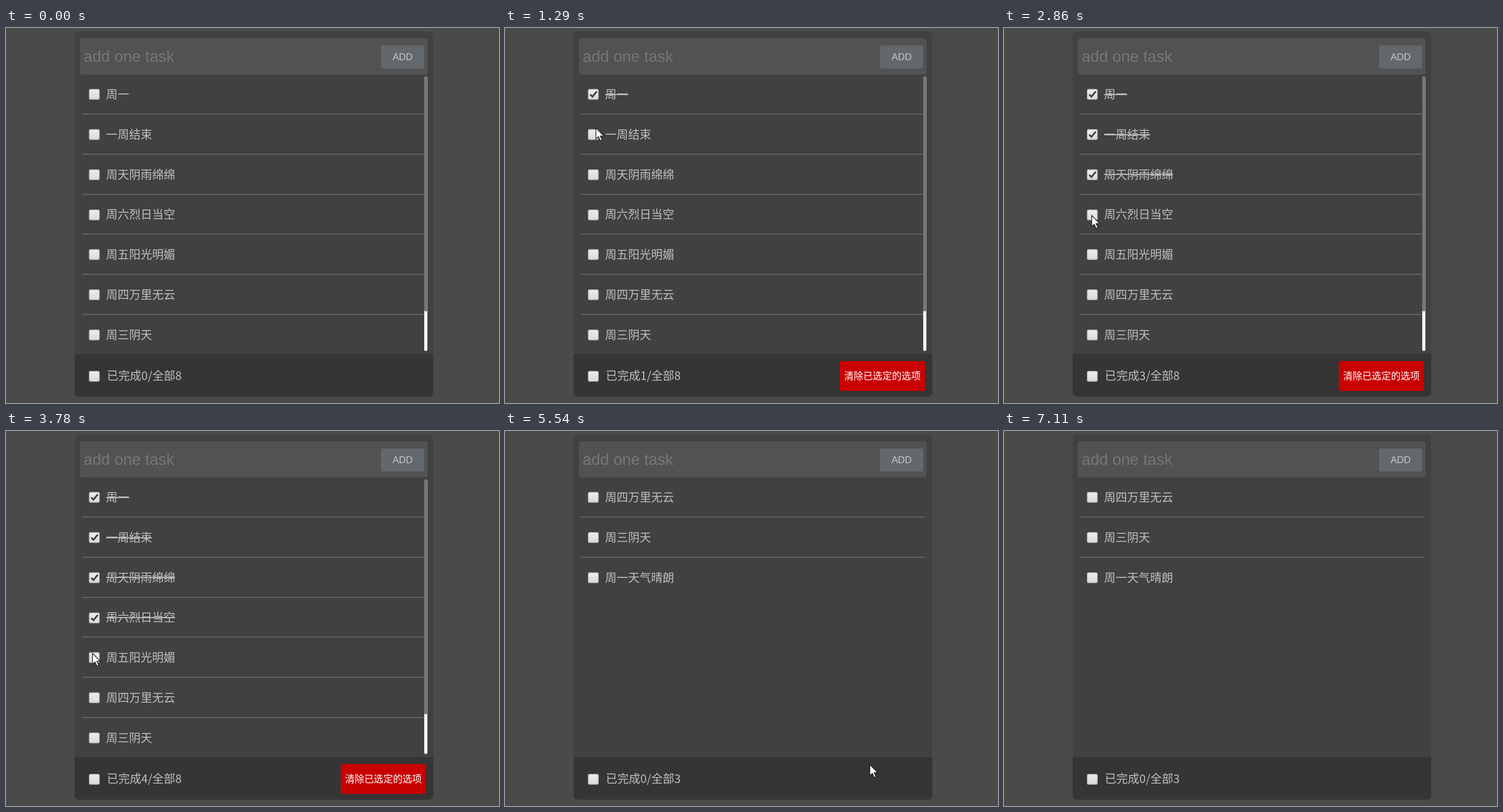
An HTML page with a canvas for the animation above (7.86 s loop, 857 by 653 pixels).

```html
<!DOCTYPE html>
<html lang="zh-CN">
<head>
<meta charset="utf-8">
<style>
  html, body { margin: 0; width: 100%; height: 100%; overflow: hidden; background: #4a4a48; }
  canvas { display: block; }
</style>
</head>
<body>
<canvas id="stage" width="857" height="653"></canvas>
<script>
const ctx = document.getElementById('stage').getContext('2d');
const LOOP = 7860, ENTER_AT = 100, CLEAR_AT = 5490, EXIT_AT = 7110;
const HAN = '"Noto Sans CJK SC", "Noto Sans CJK", "Noto Sans CJK JP", sans-serif';
const LATIN = '"Liberation Sans", Arial, sans-serif';
const TEXT = '#c0c0bf';

const tasks = ['周一', '一周结束', '周天阴雨绵绵', '周六烈日当空',
  '周五阳光明媚', '周四万里无云', '周三阴天', '周一天气晴朗'];
const checkTimes = [1110, 1840, 2400, 3550, 4150];
const rowY = i => 115.7 + i * 69.8;

const linear = k => k;
const easeOut = k => 1 - (1 - k) ** 2;
const leg = (start, duration, x, y, ease = easeOut) => ({ start, duration, x, y, ease });

// The pointer drifts slightly left and up on the checkboxes further down.
const toCheckbox = (start, i) => leg(start, 350, 160 - 2.5 * i, rowY(i) + 6 - 1.5 * i);
const legs = [
  leg(ENTER_AT, 500, 216, 160, linear),
  toCheckbox(600, 0),
  ...checkTimes.slice(0, -1).map((time, i) => toCheckbox(time, i + 1)),
  leg(4280, 840, 633, 609),
  leg(CLEAR_AT, 950, 644, 341),
  leg(6440, EXIT_AT - 6440, 787, 653, linear)
];

const ARROW = new Path2D('M0 0V19.2L4.4 15.1L7.6 22.3L10.7 21L7.6 14H13.8Z');
const HAND = new Path2D('M-2.3 2Q-2.2 0 0 0Q2 0 2.2 2V8Q4.2 6.6 5.5 9Q7.7 8 8.8 10.2' +
  'Q12 9.6 12 13V18Q12 21 10 23V25.5H-1V23.5L-7 16Q-8.4 13.4-6 12.7Q-4.4 12.6-2.3 15Z');
const KNUCKLES = new Path2D('M2.2 8V12M5.5 9V12.5M8.8 10.2V13');

function box(x, y, w, h, radius, color) {
  ctx.fillStyle = color;
  ctx.beginPath();
  ctx.roundRect(x, y, w, h, radius);
  ctx.fill();
}

function label(text, x, y, size, color, family = HAN, align = 'left') {
  ctx.font = `${size}px ${family}`;
  ctx.textAlign = align;
  ctx.fillStyle = color;
  ctx.fillText(text, x, y);
}

function checkbox(centerY, checked) {
  const top = Math.round(centerY - 9.5);
  const shade = ctx.createLinearGradient(0, top, 0, top + 19);
  shade.addColorStop(0, '#eeeeee');
  shade.addColorStop(1, '#d9d9d9');
  box(144, top, 19, 19, 3, '#a3a3a3');
  box(145.2, top + 1.2, 16.6, 16.6, 2, shade);
  if (!checked) return;
  ctx.strokeStyle = '#3c3c3c';
  ctx.lineWidth = 3;
  ctx.beginPath();
  ctx.moveTo(148.2, top + 9.8);
  ctx.lineTo(152, top + 13.6);
  ctx.lineTo(159.5, top + 4.4);
  ctx.stroke();
}

function drawCard(cleared, done) {
  ctx.fillStyle = '#4a4a48';
  ctx.fillRect(0, 0, 857, 653);
  box(119.5, 6, 623, 636, 7, '#41413f');
  box(128.5, 18, 604.5, 63, 4, '#525252');
  label('add one task', 135, 59, 27.5, '#767676', LATIN);
  box(652, 30.5, 75, 40, 3, '#63686c');
  label('ADD', 689.5, 55.5, 16.667, '#c6c7c7', LATIN, 'center');

  const shown = cleared ? tasks.slice(5) : tasks.slice(0, 7);
  shown.forEach((task, i) => {
    const y = rowY(i);
    checkbox(y, i < done);
    label(task, 174, y + 7.3, 20, TEXT);
    if (i < done) box(174, Math.round(y - 1), task.length * 20, 1.7, 0, TEXT);
    if (i < shown.length - 1) {
      box(132, Math.round(y + 33.4), cleared ? 598 : 596, 1.5, 0, '#6a6d70');
    }
  });

  if (!cleared) {
    box(727, 84.5, 5.5, 478, 3, '#f4f4f4');
    box(727, 84.5, 5.5, 409, 3, '#767676');
  }
  box(119.5, 568, 623, 74, [0, 0, 7, 7], '#363434');
  checkbox(606.5, false);
  label(`已完成${done}/全部${cleared ? 3 : 8}`, 175.3, 613, 20, TEXT);
  if (done) {
    box(582, 580, 148, 52, 4, '#c90000');
    label('清除已选定的选项', 656, 612.3, 16.667, '#fff', HAN, 'center');
  }
}

function pointerAt(t) {
  let x = 727, y = 641;
  for (const { start, duration, x: toX, y: toY, ease } of legs) {
    if (t < start) break;
    const k = ease(Math.min(1, (t - start) / duration));
    x += (toX - x) * k;
    y += (toY - y) * k;
  }
  return [x, y];
}

function drawPointer(t, cleared) {
  if (t < ENTER_AT || t >= EXIT_AT) return;
  const [x, y] = pointerAt(t);
  const overTask = x > 176 && x < 728 && y > 85 && y < (cleared ? 290 : 569);
  const overClear = !cleared && t > checkTimes[0] && x > 582 && y > 580;
  const isHand = overTask || overClear;
  const shape = isHand ? HAND : ARROW;

  ctx.save();
  ctx.translate(x, y);
  ctx.lineWidth = 1.3;
  ctx.strokeStyle = '#222';
  ctx.fillStyle = '#fff';
  ctx.fill(shape);
  ctx.stroke(shape);
  if (isHand) {
    ctx.lineWidth = 0.8;
    ctx.stroke(KNUCKLES);
  }
  ctx.restore();
}

function frame() {
  const t = performance.now() % LOOP;
  const cleared = t >= CLEAR_AT;
  const done = cleared ? 0 : checkTimes.filter(time => t >= time).length;
  drawCard(cleared, done);
  drawPointer(t, cleared);
  requestAnimationFrame(frame);
}
frame();
</script>
</body>
</html>
```
